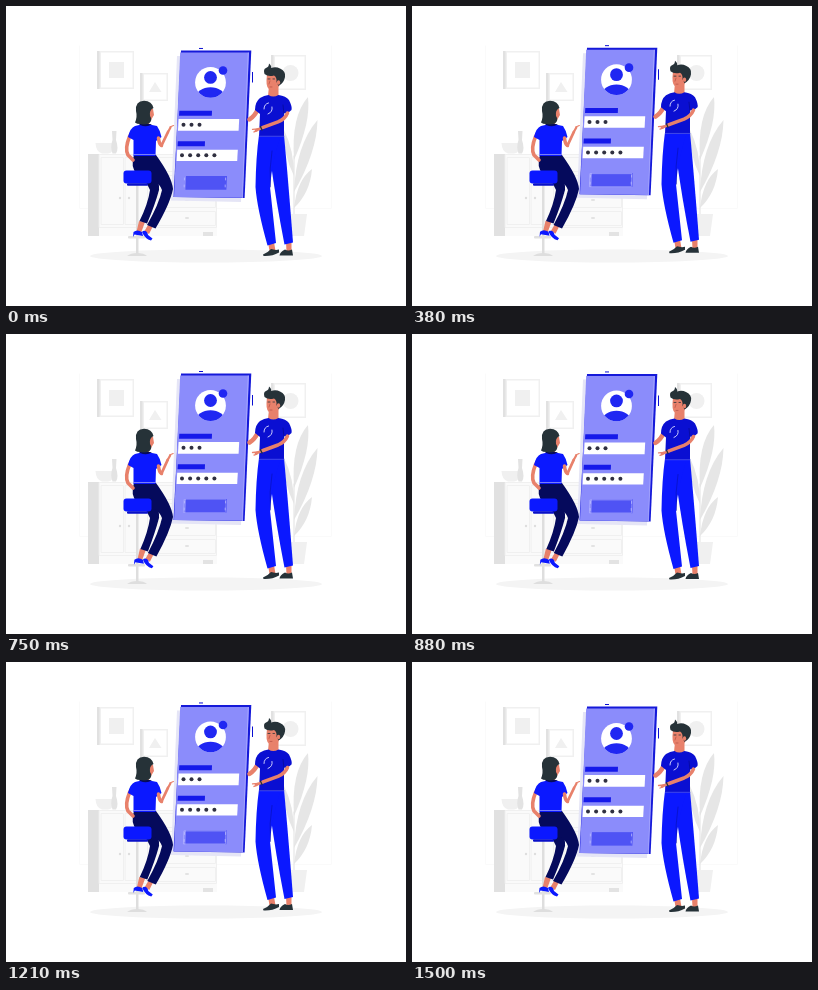
Recreate the animation shown at these times as an HTML page with a canvas. Size 400x300 px, loop 1540 ms.

```html
<!DOCTYPE html>
<html lang="en">
<head>
<meta charset="utf-8">
<title>Login</title>
<style>
html, body { margin: 0; width: 100%; height: 100%; overflow: hidden; background: #fff; }
canvas { display: block; width: 400px; height: 300px; }
</style>
</head>
<body>
<canvas id="stage" width="400" height="300"></canvas>
<script>
const ctx = document.getElementById('stage').getContext('2d');
const LOOP = 1540, STEPS = 37, LIFT = 5, LEAD = 45;
const BLUE = '#0b18ff', DEEP = '#0a0fd2', NAVY = '#050a5c', INK = '#263238', SKIN = '#e8816b';

function fill(color, path) {
  ctx.fillStyle = color;
  ctx.fill(new Path2D(path));
}
function line(color, width, path) {
  ctx.strokeStyle = color;
  ctx.lineWidth = width;
  ctx.lineCap = ctx.lineJoin = 'round';
  ctx.stroke(new Path2D(path));
}
function rect(color, x, y, w, h, r = 0) {
  ctx.fillStyle = color;
  ctx.beginPath();
  ctx.roundRect(x, y, w, h, r);
  ctx.fill();
}
function oval(color, x, y, rx, ry = rx) {
  ctx.fillStyle = color;
  ctx.beginPath();
  ctx.ellipse(x, y, rx, ry, 0, 0, Math.PI * 2);
  ctx.fill();
}
function box(x, y, w, h) {
  ctx.strokeStyle = '#f0f0f0';
  ctx.lineWidth = 1;
  ctx.strokeRect(x + .5, y + .5, w, h);
}
function shifted(x, y, draw) {
  ctx.save();
  ctx.translate(x, y);
  draw();
  ctx.restore();
}

function pictureFrame(x, y, w, h) {
  rect('#f0f0f0', x, y, w, h);
  rect('#e1e1e1', x, y, 2.5, h);
  rect('#fff', x + 4, y + 1.5, w - 5.5, h - 3);
}

function room() {
  line('#fafafa', 1, 'M73.5 40V202.5H325.5V40');
  pictureFrame(91, 45, 37, 38);
  rect('#f0f0f0', 103, 56, 15, 16);
  pictureFrame(134, 67, 28, 28);
  fill('#f0f0f0', 'M149 76L155.5 86H143Z');
  pictureFrame(265, 49, 35, 35);
  oval('#f0f0f0', 284.5, 67, 8);

  oval('#f4f4f4', 200, 250, 116, 6.5);
  rect('#fafafa', 93, 148, 118, 82);
  rect('#e1e1e1', 82, 148, 11, 82);
  box(93, 148, 117, 73);
  box(95, 151, 22, 67);
  box(119, 151, 22, 67);
  for (let y = 151; y < 215; y += 18) {
    box(152, y, 57, 14);
    rect('#e3e3e3', 179, y + 6, 4, 2, 1);
  }
  oval('#dedede', 114, 192, 1.2);
  oval('#dedede', 123, 192, 1.2);
  rect('#e3e3e3', 197, 226, 10, 4);
  fill('#f0f0f0', 'M89.5 137H109Q108 147 102 147.5H96Q90 146 89.5 137Z');
  fill('#e3e3e3', 'M106 125H110.5L110 134Q113 143 110 147.5H106.5Q104 141 106.5 134Z');

  fill('#e6e6e6', 'M288 154Q285 110 302 91Q305 116 288 154Z');
  fill('#e6e6e6', 'M288 186Q290 139 311.5 114Q311 146 288 186Z');
  fill('#e6e6e6', 'M288 202Q291 174 306 163Q304 187 288 202Z');
  fill('#e6e6e6', 'M288 170Q277 148 278 124Q288 144 288 170Z');
  line('#e1e1e1', 1, 'M288 210V150');
  fill('#f0f0f0', 'M276 208H301L298 230H279Z');
}

function phone(outline) {
  fill('#e5e5f6', 'M171 50H241L235 196L165 194.5Z');
  fill('#1519d9', 'M175 44.5H245.3L238.6 192L167.5 191Z');
  fill('#8b8cfb', 'M174.2 46.6H243L236.6 191.8L168 191Z');
  line('#b5b5ff', .7, 'M242.3 47L236.5 191.5');
  rect(DEEP, 193, 42, 4, 1);
  rect(DEEP, 246, 66, 1, 10.5);

  oval('#fff', 204.5, 76.5, 15.4);
  ctx.save();
  ctx.beginPath();
  ctx.arc(204.5, 76.5, 15.4, 0, Math.PI * 2);
  ctx.clip();
  oval('#2027f2', 204.5, 91.3, 14.5, 10);
  ctx.restore();
  oval('#2027f2', 204.5, 71.5, 6.4);
  oval('#2027f2', 217, 64.5, 4.3);

  fill('#1519ea', 'M173.3 104.8H206L205.8 109.8H173Z');
  fill('#fff', 'M172.6 113H233.2L232.6 124.7H172Z');
  fill('#1519ea', 'M171.8 135.3H199L198.8 140.3H171.5Z');
  fill('#fff', 'M171.2 143.7H231.8L231.2 155H170.6Z');
  for (let i = 0; i < 3; i++) oval('#303040', 177.5 + i * 8, 118.8, 2);
  for (let i = 0; i < 5; i++) oval('#303040', 176 + i * 8.1, 149.4, 2);

  fill('#4f53f4', 'M180 170H221L220.4 183.8H179.4Z');
  line('#c5c5ff', .7, 'M178.4 172V174M178.2 179V181M219.6 172V174M219.2 179V181');
  ctx.globalAlpha = outline * .8;
  line('#c5c5ff', .7, 'M178.3 170.5H220L219.4 183.5H177.8Z');
  ctx.globalAlpha = 1;
}

function man() {
  line(SKIN, 4.5, 'M252 103Q249 110 243.5 113.5');
  fill(SKIN, 'M262 236H268L269.5 245L263.5 245ZM280 236H285.5L285.5 246H280.5Z');
  fill(INK, 'M257 248.5Q262 246.5 265 243L270 244L273 243.5L273 246.5Q266 250.5 257.5 250Z');
  fill(INK, 'M273.5 249.5Q274 246 279 243.5Q282 245.5 286 243.5L287 249.5Z');
  fill(BLUE, 'M262 129H278Q282 172 287 236.5L278.5 238.5Q270 195 264.5 155Z');
  fill(BLUE, 'M253 129H275Q266 155 264 181L270 237L261.5 239.5Q251 202 249.5 181Q250 150 253 129Z');
  line('#0710b0', .6, 'M266 145Q263 163 264.5 181');

  fill(SKIN, 'M263 80H272.5V91Q268 95 262 90Z');
  fill(SKIN, 'M261 68Q267 65 274 69L274 78Q271 85 265 84Q260 83 260.5 74Z');
  fill(INK, 'M258.5 68Q257 63 260 62Q263 61 263 57.5Q266 60 265 62Q270 60.5 274 62.5Q280 65 279 71Q278 77 272.5 80L270.5 76Q271 71 268 69.5Q262 71 258.5 68Z');
  oval(SKIN, 272.5, 76.5, 1.7, 2.2);
  line(INK, .8, 'M262 73H264M267 73H268.5');
  line('#b54f45', .7, 'M264 75L263 78M264 81H266');

  fill(DEEP, 'M254 92Q258 89.5 262.5 89Q267 92 272.5 89Q280 90 283 94Q286.5 101 285.5 104Q282 108 278 107L278 130.5H253L254 108L249 104Q249 96 254 92Z');
  line('#070b91', .7, 'M277 99L278 108');
  line('#5a60ec', .7, 'M253.5 130.3H278');
  line('#dfe0ff', .9, 'M258 103Q258 98 262.5 97M266 101Q267 106 262 108');
  line(SKIN, 3.5, 'M281.5 107Q279 113 272 116L257 121.5');
  line(SKIN, 2.7, 'M257 121.5L250 124.3');
  line(SKIN, 1.3, 'M252 123L246.5 123.5M251 125L248 126');
  line(INK, 1.3, 'M254.5 120.7L256 124');
}

function stool() {
  rect('#dedede', 130, 178, 2.5, 70);
  rect('#e1e1e1', 122, 230, 17, 2.5, 1);
  fill('#dedede', 'M121 250Q125 247 131 247Q138 247 141 250Z');
}

function woman(swing) {
  shifted(swing, -swing * .3, () => {
    fill(SKIN, 'M133 215L139 216L135 227L130.5 226ZM142 219L147 220L143 228L138.5 225Z');
    fill(BLUE, 'M127.5 226Q131 223 136 226L137 230L128.5 228.5L127 231Z');
    fill(BLUE, 'M137 225Q141 224 142 229L146.5 232.5L145 234.5Q139 233 136 226Z');
  });
  // far leg, then near leg; the ankles follow the swing
  fill(NAVY, `M129 158L148 168Q154 177 153 184Q149 199 ${141 + swing} 217.5L${133.5 + swing} 215Q142 198 144 184L140 176L129 170Z`);
  fill(NAVY, `M128 149H150Q166 171 167 183Q164 198 ${149.5 + swing} 222.5L${141 + swing} 219Q153 198 156 184Q154 178 146 174L131 169Q124 160 128 149Z`);

  line(SKIN, 3.6, 'M123.7 130Q118.5 143 122 149L127 154');
  fill(SKIN, 'M136 112H143V122H135Z');
  fill(BLUE, 'M129 120Q138 117 146 119L151 120Q154.5 125 155.5 131L150 135L149.5 150H127.5L127.5 134L122 131Q124 122 129 120Z');
  fill(NAVY, 'M133 118H146Q141 122 134 119Z');
  line('#a6aafa', .7, 'M128 148.5H149');
  fill(SKIN, 'M142 100L147 103L148 109L145 114L140 114Z');
  fill(INK, 'M129 116.5Q131.5 111 130 105Q129 95 138 94.7Q146 95 147.5 102Q143 104 144 110Q147 114 143 117.5Q139 119 134 118Q131 118 129 116.5Z');
  line(SKIN, 3.5, 'M152.5 132Q153 138 155.5 139.5');
  line(SKIN, 2.8, `M155.5 139.5L${162 - swing * .4} 126`);
  line(SKIN, 2.2, `M${162 - swing * .4} 126L${164.5 - swing * .4} 121.5`);
  line(SKIN, 1.2, `M${164 - swing * .4} 121L${167.5 - swing * .4} 119.5`);

  rect(BLUE, 117.5, 164.5, 28, 13, 3);
  rect('#0910c8', 121, 177.3, 21, 2.4, 1);
}

function render(now) {
  const t = Math.floor((now % LOOP) / LOOP * STEPS) / STEPS * LOOP;
  const rise = (1 - Math.cos((t + LEAD) / LOOP * Math.PI * 2)) / 2;
  const pulse = t < 580 ? Math.sin(Math.PI * t / 580) : Math.sin(Math.PI * (t - 580) / 960);
  ctx.fillStyle = '#fff';
  ctx.fillRect(0, 0, 400, 300);
  room();
  shifted(0, -LIFT * rise, () => {
    phone(pulse);
    man();
  });
  stool();
  woman(rise * .9);
}

const start = performance.now();
function tick() {
  render(performance.now() - start);
  requestAnimationFrame(tick);
}
tick();
</script>
</body>
</html>
```
